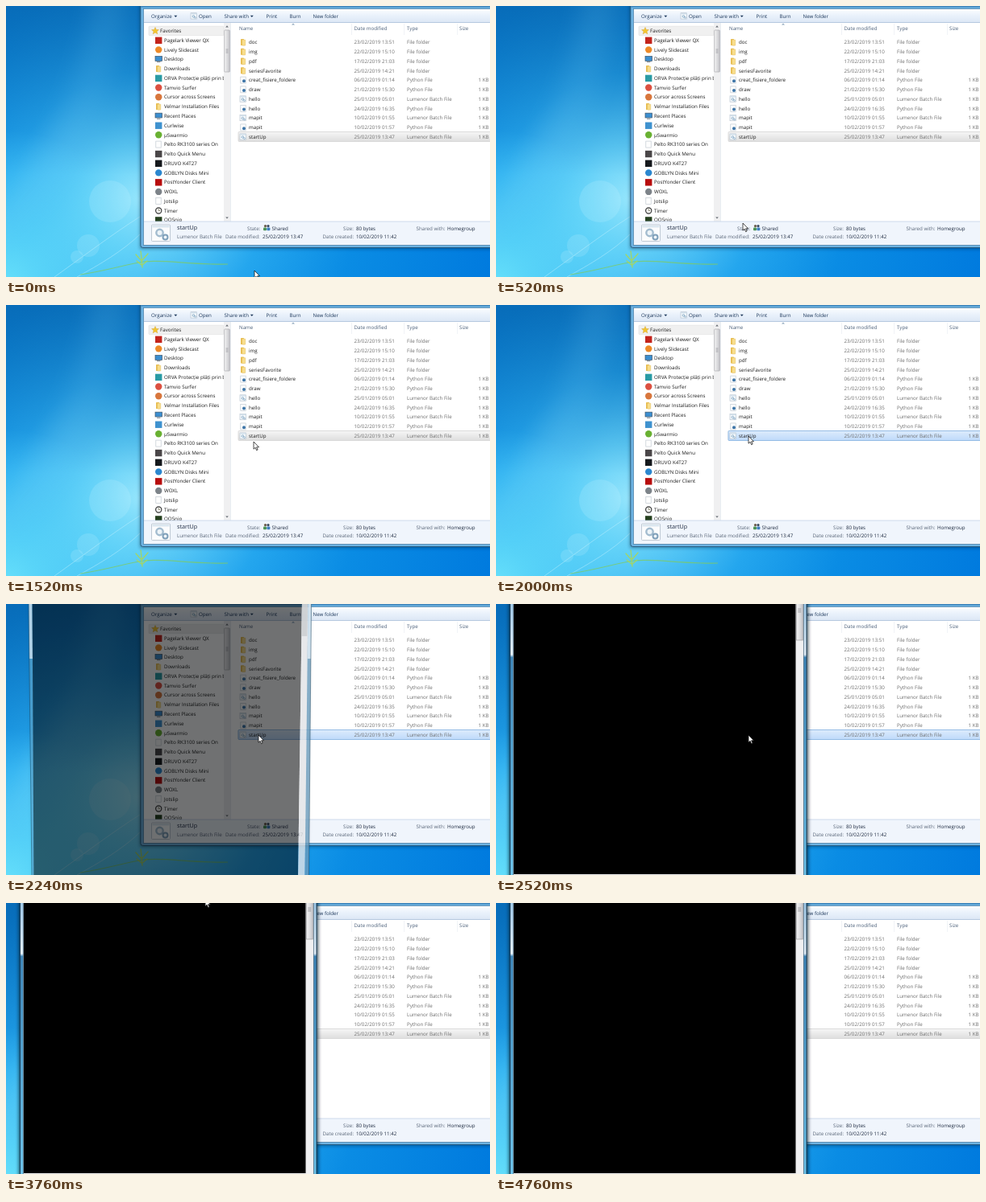
Recreate the animation shown at these times as an HTML page. Size 600 by 337 pixels, loop 5000 ms.

```html
<!DOCTYPE html>
<html lang="en">
<head>
<meta charset="utf-8">
<title>Starting a batch file</title>
<style>
  html, body { margin: 0; width: 100%; height: 100%; overflow: hidden; background: #1688d3; }
  svg { display: block; width: 600px; height: 337px; }
  text { font: 6.2px "Open Sans", "Noto Sans", sans-serif; text-rendering: geometricPrecision; white-space: pre; }
</style>
</head>
<body>
<svg id="stage" viewBox="0 0 600 337">
  <defs>
    <radialGradient id="sky" gradientUnits="userSpaceOnUse" cx="165" cy="240" r="450">
      <stop offset="0" stop-color="#94e5fc"/>
      <stop offset=".15" stop-color="#5fcdf7"/>
      <stop offset=".35" stop-color="#24a6ee"/>
      <stop offset=".6" stop-color="#0a8ce4"/>
      <stop offset="1" stop-color="#007ade"/>
    </radialGradient>
    <linearGradient id="dusk" x2="0" y2="1">
      <stop offset="0" stop-color="#075a9f" stop-opacity=".62"/>
      <stop offset="1" stop-color="#075a9f" stop-opacity="0"/>
    </linearGradient>
    <radialGradient id="glow">
      <stop offset="0" stop-color="#66e0fb"/>
      <stop offset="1" stop-color="#66e0fb" stop-opacity="0"/>
    </radialGradient>
    <linearGradient id="bar" x2="0" y2="1">
      <stop offset="0" stop-color="#fbfdff"/>
      <stop offset=".5" stop-color="#e9f1fb"/>
      <stop offset="1" stop-color="#dce7f5"/>
    </linearGradient>
    <linearGradient id="grey" x2="0" y2="1">
      <stop offset="0" stop-color="#f6f6f6"/>
      <stop offset="1" stop-color="#dedede"/>
    </linearGradient>
    <linearGradient id="blue" x2="0" y2="1">
      <stop offset="0" stop-color="#dcebfc"/>
      <stop offset="1" stop-color="#bfdafa"/>
    </linearGradient>
    <linearGradient id="thumb">
      <stop offset="0" stop-color="#f3f3f3"/>
      <stop offset=".5" stop-color="#dedee0"/>
      <stop offset="1" stop-color="#c4c4c8"/>
    </linearGradient>
    <linearGradient id="glass" x2="0" y2="1">
      <stop offset="0" stop-color="#9cc6e6"/>
      <stop offset=".19" stop-color="#e4eff8"/>
      <stop offset=".2" stop-color="#3d85b8"/>
      <stop offset="1" stop-color="#6cc3ea"/>
    </linearGradient>
    <filter id="soft" x="-20%" y="-20%" width="140%" height="140%"><feGaussianBlur stdDeviation="2"/></filter>
    <filter id="haze" x="-50%" y="-50%" width="200%" height="200%"><feGaussianBlur stdDeviation="14"/></filter>
    <clipPath id="sidebar"><rect x="171" y="21" width="99" height="247"/></clipPath>
  </defs>
</svg>
<script>
const NS = "http://www.w3.org/2000/svg";
const LOOP = 5000;
const ROW = 11.77;
const stage = document.getElementById("stage");

function add(parent, tag, attrs = {}, content) {
  const el = document.createElementNS(NS, tag);
  for (const key in attrs) el.setAttribute(key, attrs[key]);
  if (content) el.textContent = content;
  return parent.appendChild(el);
}
const group = (parent, attrs) => add(parent, "g", attrs);
const rect = (p, x, y, width, height, fill, extra) => add(p, "rect", { x, y, width, height, fill, ...extra });
const dot = (p, cx, cy, r, fill, extra) => add(p, "circle", { cx, cy, r, fill, ...extra });
const path = (p, d, extra) => add(p, "path", { d, fill: "none", ...extra });
// y is the vertical middle of the line
const label = (p, x, y, content, fill = "#1c1c1c", extra) =>
  add(p, "text", { x, y: y + 2.2, fill, ...extra }, content);

// Each step holds its value until the next one.
function animateSteps(el, property, steps) {
  const frames = steps.map(([time, value]) => ({ offset: time / LOOP, [property]: value, easing: "step-end" }));
  frames.push({ offset: 1, [property]: steps[steps.length - 1][1] });
  el.animate(frames, { duration: LOOP, iterations: Infinity });
}

function drawDesktop() {
  const g = group(stage);
  rect(g, 0, 0, 600, 337, "url(#sky)");
  rect(g, 0, 0, 600, 210, "url(#dusk)");
  dot(g, 0, 345, 190, "url(#glow)");
  path(g, "M-20 250C50 190 90 100 110 -20L150 -20C140 110 80 240 -20 300Z",
    { fill: "#7fd6fa", opacity: .14, filter: "url(#haze)" });
  for (const [x, y, r] of [[129, 243, 26], [102, 298, 14], [88, 312, 8]]) dot(g, x, y, r, "#d8f7ff", { opacity: .16 });
  path(g, "M60 337C95 312 130 285 166 262M88 337C115 322 145 305 168 282", { stroke: "#c2f1fc", "stroke-width": .8, opacity: .6 });
  path(g, "M92 334C125 329 150 321 170 318C200 315 225 322 275 321", { stroke: "#7ecb62", "stroke-width": 1.1, opacity: .75 });
  path(g, "M169 325C168 318 168 311 167 305M168 317L161 309M169 316L176 308M168 322L162 317M169 322L175 317",
    { stroke: "#a9d65c", "stroke-width": 1.4, "stroke-linecap": "round", opacity: .9 });
}

function folder(p, x, y) {
  rect(p, x + 1, y - 4, 4, 8, "#e8bd4f", { rx: .6 });
  rect(p, x + 2.6, y - 3, 4.2, 7.2, "#f8dd8b", { rx: .6, stroke: "#dcb65a", "stroke-width": .4 });
}

function sheet(p, x, y) {
  rect(p, x + .8, y - 4, 6.4, 8, "#fdfdfd", { stroke: "#b9c2cb", "stroke-width": .6 });
}

function batchIcon(p, x, y) {
  rect(p, x, y - 3.8, 7.6, 7.4, "#f4f8fb", { stroke: "#b0bdca", "stroke-width": .6 });
  rect(p, x + .3, y - 3.5, 7, 1.4, "#d2e0eb");
  dot(p, x + 3.4, y + .4, 1.3, "none", { stroke: "#86aac6", "stroke-width": .9 });
  dot(p, x + 5.5, y + 1.9, .9, "none", { stroke: "#86aac6", "stroke-width": .8 });
}

function scriptIcon(p, x, y) {
  sheet(p, x, y);
  dot(p, x + 5, y + 1.2, 2, "#3d75a8");
}

const FAVORITES = [
  ["Pagelark Viewer QX", "square", "#c3241c"],
  ["Lively Slidecast", "circle", "#ee8a27"],
  ["Desktop", "screen"],
  ["Downloads", "folder"],
  ["ORVA Protecție plăți prin b", "square", "#2a9ba5"],
  ["Tamvio Surfer", "circle", "#dc5040"],
  ["Cursor across Screens", "circle", "#d8763c"],
  ["Velmar Installation Files", "folder"],
  ["Recent Places", "screen"],
  ["Curlwise", "square", "#3f92cf"],
  ["µSwarmio", "circle", "#69b132"],
  ["Pelto RK3100 series On", "sheet"],
  ["Pelto Quick Menu", "square", "#4a4648"],
  ["DRUVO K4T27", "square", "#15181c"],
  ["GOBLYN Disks Mini", "circle", "#2b87cf"],
  ["PostYonder Client", "square", "#b80d0d"],
  ["WOXL", "circle", "#7d8389"],
  ["Jotslip", "sheet"],
  ["Timer", "clock"],
  ["QQSnip", "square", "#26401f"]
];

function favoriteIcon(p, kind, color, y) {
  const x = 185;
  if (kind === "square") rect(p, x, y - 4, 8.4, 8.4, color);
  else if (kind === "circle") dot(p, x + 4.2, y, 4.2, color);
  else if (kind === "folder") folder(p, x, y);
  else if (kind === "sheet") sheet(p, x, y);
  else if (kind === "clock") {
    dot(p, x + 4.2, y, 3.6, "#f4f4f2", { stroke: "#3b3b3b", "stroke-width": 1.2 });
    path(p, `M${x + 4.2} ${y - 2.2}V${y}H${x + 6}`, { stroke: "#553", "stroke-width": .6 });
  } else {
    rect(p, x, y - 3.6, 8.4, 5.8, "#3b8ed0", { stroke: "#3d5265", "stroke-width": .7 });
    rect(p, x + 2, y + 3, 4.4, 1, "#75838f");
  }
}

function drawSidebar(win) {
  const g = group(win, { "clip-path": "url(#sidebar)" });
  rect(g, 177, 25.2, 93, 11.4, "#f0f0f0", { stroke: "#e0e0e0", "stroke-width": .6, rx: 1 });
  path(g, "M185 26.5L186.2 29.4L189.4 29.6L187 31.7L187.8 34.8L185 33.1L182.2 34.8L183 31.7L180.6 29.6L183.8 29.4Z",
    { fill: "#f4c62f", stroke: "#cf9a21", "stroke-width": .4 });
  label(g, 191, 31, "Favorites");
  FAVORITES.forEach(([name, kind, color], i) => {
    const y = 42.6 + i * ROW;
    favoriteIcon(g, kind, color, y);
    label(g, 196, y, name);
  });
  rect(win, 270, 21, 8, 247, "#f0f0f1");
  rect(win, 270.6, 30, 6.8, 52, "url(#thumb)", { stroke: "#a5a5a9", "stroke-width": .6, rx: .8 });
  path(win, "M272.5 54H275.5M272.5 56H275.5M272.5 58H275.5", { stroke: "#85858a", "stroke-width": .6 });
  path(win, "M272.2 26.4L274 24.2L275.8 26.4ZM272.2 262.4L274 264.6L275.8 262.4Z", { fill: "#666b72" });
  rect(win, 278, 21, .7, 247, "#dfe5ec");
}

const FILES = [
  ["doc", "23/02/2019 13:51", "File folder"],
  ["img", "22/02/2019 15:10", "File folder"],
  ["pdf", "17/02/2019 21:03", "File folder"],
  ["seriesFavorite", "25/02/2019 14:21", "File folder"],
  ["creat_fisiere_foldere", "06/02/2019 01:14", "Python File"],
  ["draw", "21/02/2019 15:30", "Python File"],
  ["hello", "25/01/2019 05:01", "Lumenor Batch File"],
  ["hello", "24/02/2019 16:35", "Python File"],
  ["mapit", "10/02/2019 01:55", "Lumenor Batch File"],
  ["mapit", "10/02/2019 01:57", "Python File"],
  ["startUp", "25/02/2019 13:47", "Lumenor Batch File"]
];

function drawFiles(win) {
  const head = "#4c607a", muted = "#6d6d6d";
  [[289, "Name"], [431.5, "Date modified"], [497, "Type"], [562, "Size"]]
    .forEach(([x, name]) => label(win, x, 28, name, head));
  for (const x of [428, 493.5, 559.5]) rect(win, x, 22, .6, 14, "#e4e9f0");
  path(win, "M354 23.6L356 21.6L358 23.6Z", { fill: "#8fa7bd" });

  const row = (fill, stroke) => rect(win, 288, 156.5, 320, 12, fill, { stroke, "stroke-width": .8, rx: 1 });
  row("url(#grey)", "#d3d3d3");
  const active = row("url(#blue)", "#86b4e4");
  animateSteps(active, "visibility", [[0, "hidden"], [1760, "visible"], [3000, "hidden"]]);

  FILES.forEach(([name, date, type], i) => {
    const y = 45 + i * ROW;
    const icon = type === "File folder" ? folder : type === "Python File" ? scriptIcon : batchIcon;
    icon(win, 290, y);
    label(win, 301, y, name);
    label(win, 431.5, y, date, muted);
    label(win, 497, y, type, muted);
    if (type !== "File folder") label(win, 598.5, y, "1 KB", muted, { "text-anchor": "end" });
  });
}

function drawToolbar(win) {
  const ink = "#1e395b";
  rect(win, 171, 4, 429, 16.5, "url(#bar)");
  rect(win, 171, 20, 429, .8, "#a9bfd9");
  [[180, "Organize"], [239, "Open"], [270.5, "Share with"], [322.5, "Print"], [351.5, "Burn"], [380.5, "New folder"]]
    .forEach(([x, name]) => label(win, x, 12.6, name, ink));
  path(win, "M208.3 11.8H212.3L210.3 14ZM302.8 11.8H306.8L304.8 14Z", { fill: ink });
  batchIcon(win, 229, 12.5);
}

function drawDetails(win) {
  const soft = "#5a6779", ink = "#1e2b40";
  rect(win, 171, 268, 429, 29, "#f0f5fc");
  rect(win, 171, 267.6, 429, .8, "#c3d3e6");
  rect(win, 180.5, 272, 23, 20.5, "#fbfcfd", { stroke: "#b3bec9", "stroke-width": .8, rx: 1 });
  rect(win, 181.5, 273, 21, 2.5, "#dbe7f0");
  dot(win, 190.5, 282, 4.2, "#eef4f8", { stroke: "#a3bccf", "stroke-width": 2.4 });
  dot(win, 197.5, 287.5, 3, "#eef4f8", { stroke: "#7fa0ba", "stroke-width": 2 });
  label(win, 212, 276.2, "startUp", ink, { style: "font-size:7.2px" });
  dot(win, 321.5, 273.6, 1.6, "#6a5b4a");
  dot(win, 325, 273.6, 1.6, "#3b4a60");
  rect(win, 319, 275.4, 4, 3.8, "#4c9257", { rx: 1 });
  rect(win, 323.4, 275.4, 4, 3.8, "#3f7fc0", { rx: 1 });
  [
    [299, 276.4, "State:", soft], [329.5, 276.4, "Shared", ink],
    [418, 276.4, "Size:", soft], [434, 276.4, "80 bytes", ink],
    [508.5, 276.4, "Shared with:", soft], [547, 276.4, "Homegroup", ink],
    [212, 286.8, "Lumenor Batch File", soft],
    [272, 286.8, "Date modified:", soft], [318, 286.8, "25/02/2019 13:47", ink],
    [392.5, 286.8, "Date created:", soft], [434, 286.8, "10/02/2019 11:42", ink]
  ].forEach(args => label(win, ...args));
}

function drawExplorer() {
  const win = group(stage);
  rect(win, 166, -20, 460, 322, "#06243f", { opacity: .45, filter: "url(#soft)" });
  rect(win, 166.8, -10, 460, 310.5, "#6db3e2", { stroke: "#24506f", "stroke-width": .8, rx: 3 });
  rect(win, 170.4, 3.4, 440, 294, "#fff", { stroke: "#4f83aa", "stroke-width": .8 });
  rect(win, 167, 0, 433, 1.5, "#3f86bb");
  drawToolbar(win);
  drawSidebar(win);
  drawFiles(win);
  drawDetails(win);
}

// The console fades in slightly tilted before it settles.
function drawOpeningConsole() {
  const g = group(stage);
  path(g, "M27.5 -5H378.5L375.5 340H32Z", { fill: "#0b2b3f", opacity: .08, filter: "url(#soft)" });
  path(g, "M28 -5H33L35 340H32.5Z", { fill: "#5aa5cf", opacity: .7 });
  path(g, "M28.2 -5H32.2L33 68H29Z", { fill: "#d5e6f2", opacity: .75 });
  path(g, "M32.5 -5H367L362 340H34.5Z", { fill: "#000", opacity: .52 });
  path(g, "M367 -5H374.5L370.5 340H362Z", { fill: "#e6e8ea", opacity: .8 });
  path(g, "M367 -5H374L373.4 40H366.4Z", { fill: "#c6c9cc", opacity: .7 });
  path(g, "M374.5 -5H378.5L375.5 340H370.5Z", { fill: "#6c9dbd", opacity: .8 });
  path(g, "M374.5 -5H378.5L378 68H373.8Z", { fill: "#e4eff8", opacity: .8 });
  path(g, "M28 -5L32 340M378.5 -5L375.5 340", { stroke: "#20445a", "stroke-width": .7, opacity: .7 });
  animateSteps(g, "visibility", [[0, "hidden"], [2240, "visible"], [2520, "hidden"]]);
}

function drawConsole() {
  const g = group(stage);
  rect(g, 16, -20, 371, 380, "#031a2c", { opacity: .75, filter: "url(#soft)" });
  rect(g, 17.4, -2, 367.6, 342, "url(#glass)", { stroke: "#14364e", "stroke-width": .9 });
  rect(g, 21.3, -2, 360, 342, "#f0f0f1", { stroke: "#3d5d73", "stroke-width": .7 });
  rect(g, 22, 0, 349.5, 336, "#000");
  rect(g, 372.3, -2, 8, 47, "url(#thumb)", { stroke: "#9a9a9e", "stroke-width": .7 });
  path(g, "M374.2 6H378.2M374.2 8H378.2M374.2 10H378.2", { stroke: "#77777c", "stroke-width": .6 });
  animateSteps(g, "visibility", [[0, "hidden"], [2520, "visible"]]);
}

const POINTER = [
  [0, 308, 329], [240, 308, 318], [520, 306, 270], [760, 302, 220], [1000, 298, 191],
  [1240, 300, 181], [1520, 307, 170], [1760, 313, 163], [3000, 301, 138], [3240, 276, 70],
  [3520, 256, 20], [3760, 247, -5], [4000, 240, 24], [4240, 236, 16], [4520, 232, 1], [4760, 232, -30]
];

function drawPointer() {
  const pointer = path(stage, "M0 0V9.2L2.1 7.3L3.6 10.7L5.1 10L3.6 6.8H6.5Z",
    { fill: "#fff", stroke: "#000", "stroke-width": .7, "stroke-linejoin": "round" });
  animateSteps(pointer, "transform", POINTER.map(([time, x, y]) => [time, `translate(${x}px, ${y}px)`]));
}

drawDesktop();
drawExplorer();
drawOpeningConsole();
drawConsole();
drawPointer();
</script>
</body>
</html>
```
